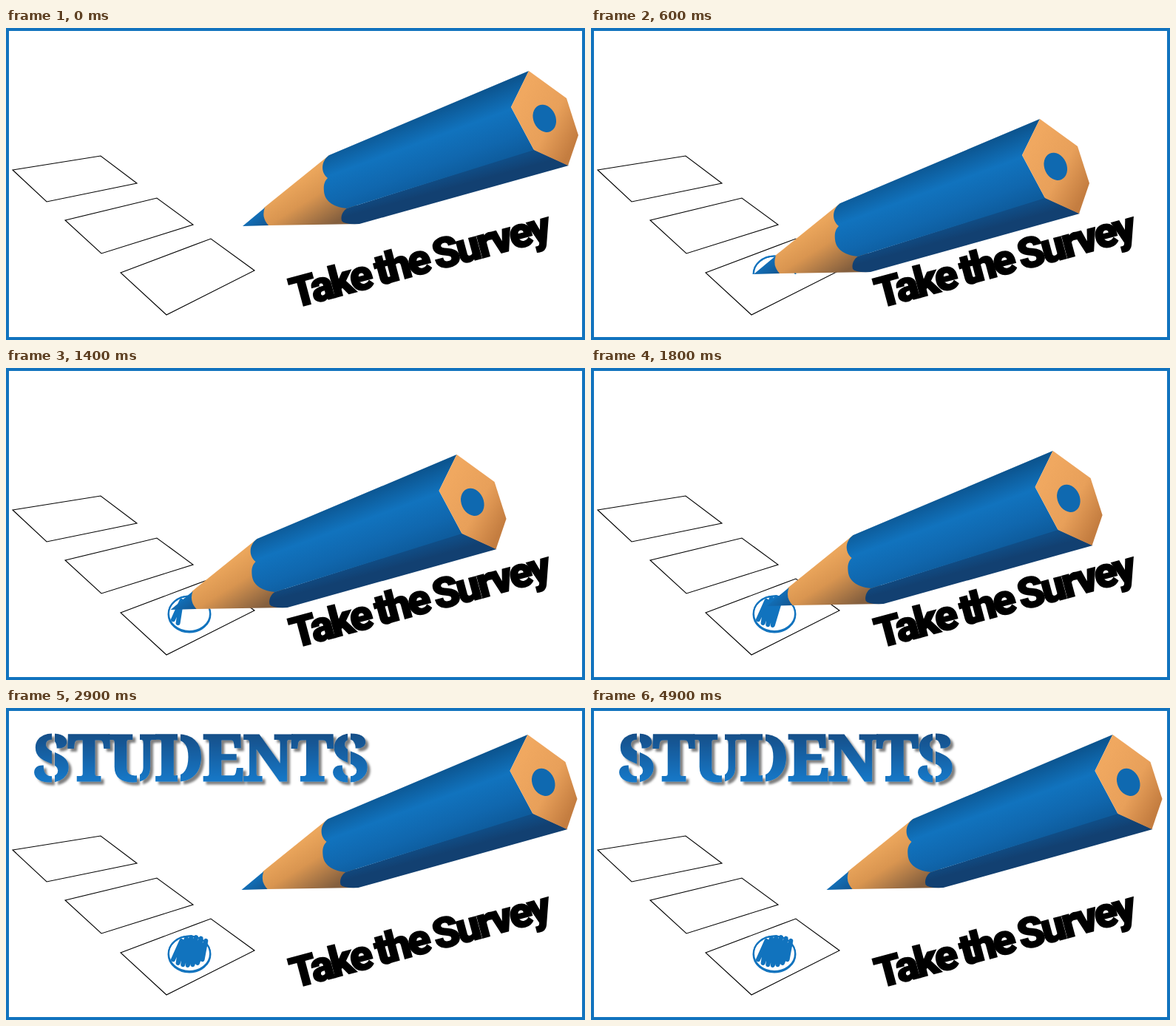
Recreate the animation shown at these times as an HTML page. Size 783x422 px, loop 5400 ms.

```html
<!DOCTYPE html>
<html lang="en">
<head>
<meta charset="utf-8">
<title>Take the Survey</title>
<style>
  html, body { margin: 0; width: 100%; height: 100%; overflow: hidden; background: #fff; }
  svg { display: block; width: 783px; height: 422px; }
  .box { fill: none; stroke: #000; stroke-width: 1.1; }
  .ink { fill: none; stroke: #1173be; }
  .slogan {
    font: 900 57px Impact, Roboto, sans-serif; letter-spacing: -3.2px; word-spacing: -3px;
    stroke: #000; stroke-width: 1.8px;
  }
  .title {
    font: 900 86px "Noto Serif", "Liberation Serif", serif; letter-spacing: -1.6px;
    fill: url(#letters); stroke: url(#letters); stroke-width: 3px;
  }
</style>
</head>
<body>
<svg viewBox="0 0 783 422">
  <defs>
    <linearGradient id="top" gradientUnits="userSpaceOnUse" x1="555" y1="118" x2="588" y2="208">
      <stop offset="0" stop-color="#0c5590"/>
      <stop offset=".38" stop-color="#1173be"/>
      <stop offset=".75" stop-color="#1067ae"/>
      <stop offset="1" stop-color="#0e5c9d"/>
    </linearGradient>
    <linearGradient id="side" gradientUnits="userSpaceOnUse" x1="600" y1="199" x2="609" y2="232">
      <stop offset="0" stop-color="#104d86"/>
      <stop offset=".5" stop-color="#124071"/>
    </linearGradient>
    <linearGradient id="wood" gradientUnits="userSpaceOnUse" x1="385" y1="212" x2="425" y2="276">
      <stop offset="0" stop-color="#eba65c"/>
      <stop offset=".4" stop-color="#d99550"/>
      <stop offset="1" stop-color="#845f3e"/>
    </linearGradient>
    <linearGradient id="end" gradientUnits="userSpaceOnUse" x1="690" y1="105" x2="772" y2="150">
      <stop offset="0" stop-color="#f0a860"/>
      <stop offset=".55" stop-color="#e8a05a"/>
      <stop offset="1" stop-color="#c47d40"/>
    </linearGradient>
    <linearGradient id="tip" gradientUnits="userSpaceOnUse" x1="335" y1="250" x2="350" y2="270">
      <stop offset="0" stop-color="#1173be"/>
      <stop offset="1" stop-color="#145690"/>
    </linearGradient>
    <linearGradient id="letters" gradientUnits="userSpaceOnUse" x1="0" y1="37" x2="0" y2="99">
      <stop offset="0" stop-color="#14508a"/>
      <stop offset="1" stop-color="#1278c8"/>
    </linearGradient>
    <filter id="shadow" x="-5%" y="-20%" width="110%" height="150%">
      <feDropShadow dx="4" dy="4" stdDeviation="1.6" flood-color="#000" flood-opacity=".5"/>
    </filter>
    <mask id="stencil" maskUnits="userSpaceOnUse" x="0" y="0" width="783" height="130">
      <rect width="783" height="130" fill="#fff"/>
      <path d="M64 0V130M179 0V130M234 0V130M464 0V130" stroke="#000" stroke-width="4"/>
    </mask>
  </defs>

  <rect width="783" height="422" fill="#fff"/>
  <path class="box" d="M9 192L128 173L177 210L55 235Z M80 260L204 230L253 266L129 305Z M155 331L277 285L336 328L217 388Z"/>

  <g class="ink">
    <g id="ring" stroke-width="2">
      <path pathLength="100" d="M276.5 333A28.5 24.5 0 0 0 219.5 333A28.5 24.5 0 0 0 276.5 333"/>
      <path pathLength="100" d="M276 332.2A28 23.8 0 0 0 220 332.2A28 23.8 0 0 0 276 332.2"/>
    </g>
    <polyline id="scribble" stroke-width="6" stroke-linejoin="round" stroke-linecap="round"/>
  </g>

  <g id="pencil">
    <path fill="url(#wood)" d="M437 172L349 243Q345 256 354 267L478 265L470 215Z"/>
    <path fill="url(#tip)" d="M320 268L350 243Q345 256 355 267Z"/>
    <path fill="url(#side)" d="M461 244L713 164L761 186L478 265Q457 266 454 261C452 254 456 247 461 244Z"/>
    <path fill="url(#top)" d="M437 172L707 58L683 107L714 165L461 244C441 242 431 233 430 221C429 212 431 207 435 203C425 195 426 180 437 172Z"/>
    <path fill="url(#end)" d="M707 58L758 95L774 145L760 186L714 165L683 107Z"/>
    <ellipse cx="728.5" cy="122.5" rx="15" ry="19.3" transform="rotate(-24 728 123)" fill="#0f69b0"/>
  </g>

  <text class="slogan" transform="translate(390 379) rotate(-15)">Take the Survey</text>
  <g id="title" filter="url(#shadow)">
    <text class="title" x="37" y="98" mask="url(#stencil)">STUDENTS</text>
  </g>
  <rect x="2" y="2" width="779" height="418" fill="none" stroke="#1173be" stroke-width="4"/>
</svg>
<script>
  const LOOP = 5400, STEP = 200, BLINK = 500, REST = 2400;
  const STROKES = 13;
  const $ = id => document.getElementById(id);
  const clamp = v => Math.min(1, Math.max(0, v));

  // Zigzag that fills the ring from left to right.
  const zigzag = Array.from({ length: STROKES }, (_, i) => {
    const up = i % 2, c = i / 6 - 1;
    const reach = 19 * Math.sqrt(1 - 0.65 * c * c);
    return [228 + 3.3 * i + (up ? 6 : -2), 329 + (up ? -reach : reach)];
  });

  // Pencil point: rest, one turn round the ring, six shading strokes, lift.
  function tipAt(step) {
    if (step === 0) return [320, 268];
    if (step <= 5) {
      const a = (step - 1) * Math.PI / 2;
      return [248 + 28 * Math.cos(a), 333 - 25 * Math.sin(a)];
    }
    if (step <= 11) {
      const n = step - 6, swing = 5.5 + 2.5 * n;
      return [222 + 37 * clamp((n / 4) ** 3), 335 + (n % 2 ? -swing : swing)];
    }
    return [318.5, 246];
  }

  function draw() {
    const t = performance.now() % LOOP;
    const step = Math.min(12, Math.floor(t / STEP));
    const [x, y] = tipAt(step);
    const turn = clamp((step - 1) / 4);
    const shade = clamp((step - 6) / 5);
    const blink = t >= REST && Math.floor((t - REST) / BLINK) % 2;

    $('pencil').setAttribute('transform', `translate(${x - 320} ${y - 268})`);
    $('ring').style.strokeDasharray = turn < 1 ? `${turn * 100} 200` : 'none';
    $('ring').style.visibility = turn ? 'visible' : 'hidden';
    $('scribble').setAttribute('points', zigzag.slice(0, Math.round(shade * STROKES)).join(' '));
    $('title').style.visibility = blink ? 'visible' : 'hidden';
    requestAnimationFrame(draw);
  }
  draw();
</script>
</body>
</html>
```
